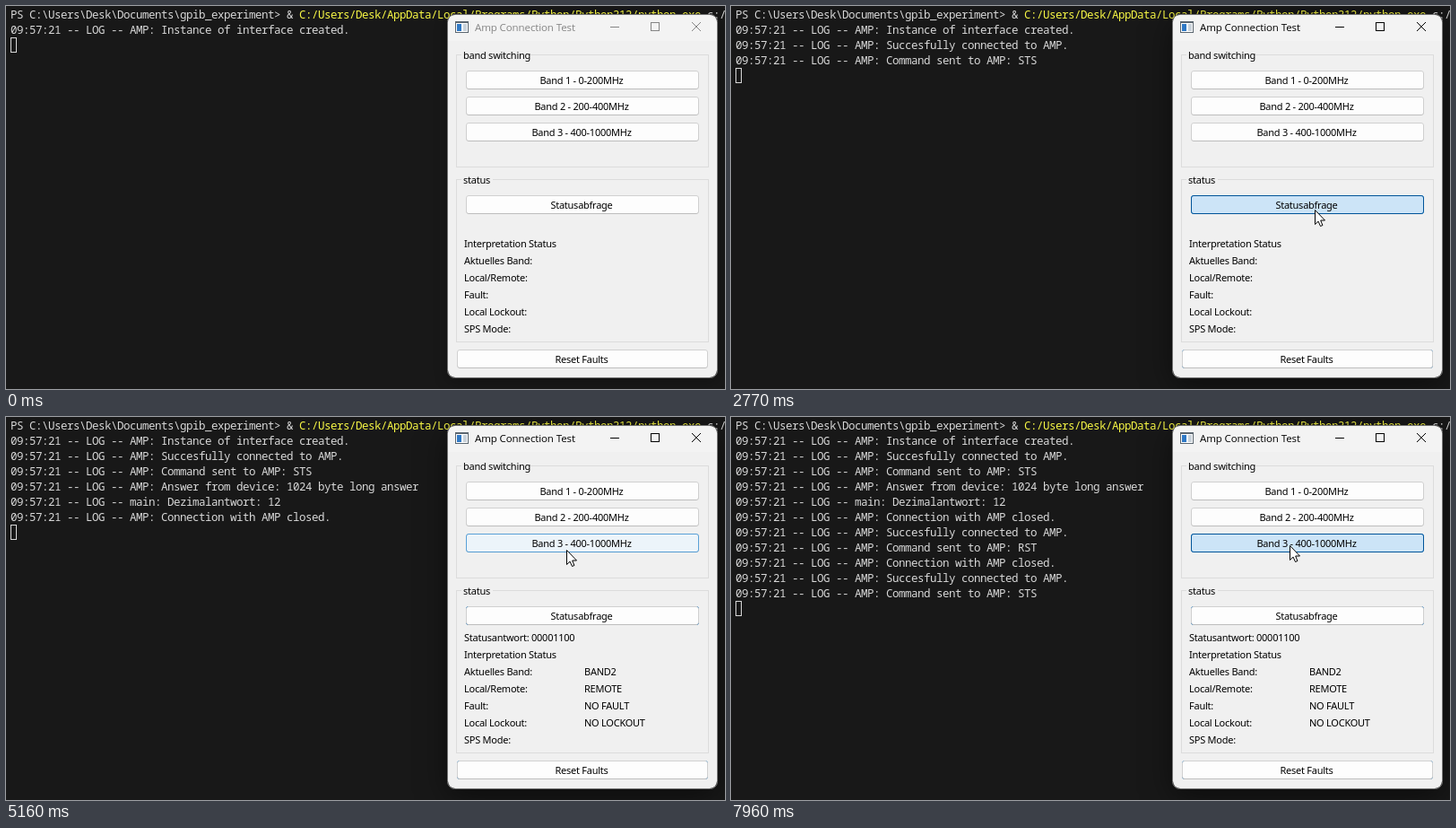
Write an HTML page with a canvas that moves like this. It is 802 by 427 pixels and loops after 8000 ms.

```html
<!DOCTYPE html>
<html lang="en">
<head>
<meta charset="utf-8">
<title>Amp Connection Test</title>
<style>
html, body { margin: 0; width: 100%; height: 100%; overflow: hidden; background: #181818; }
canvas { display: block; }
</style>
</head>
<body>
<canvas id="stage" width="802" height="427"></canvas>
<script>
const ctx = document.getElementById('stage').getContext('2d');
const LOOP = 8000, TICK = 70, FADE = 240;
const PRESS = 1430, ANSWER = 3170;

const MONO = { font: '500 12.5px "Noto Sans Mono", monospace', spacing: -0.5 };
const UI = { font: '11px "Noto Sans", sans-serif', spacing: -0.25 };
const TITLE = { font: '11.5px "Open Sans", sans-serif', spacing: -0.1 };

const NORMAL = { fill: '#fdfdfd', side: '#d0d0d0', base: '#bababa' };
const HOVER = { fill: '#e0eef9', side: '#0078d4', base: '#0078d4' };
const PRESSED = { fill: '#cce4f7', side: '#005499', base: '#005499' };

// Terminal output in batches: time, lines
const LOG = [
  [0, 'AMP: Instance of interface created.'],
  [2770, 'AMP: Succesfully connected to AMP.', 'AMP: Command sent to AMP: STS'],
  [ANSWER, 'AMP: Answer from device: 1024 byte long answer',
    'main: Dezimalantwort: 12', 'AMP: Connection with AMP closed.'],
  [6970, 'AMP: Succesfully connected to AMP.', 'AMP: Command sent to AMP: RST',
    'AMP: Connection with AMP closed.'],
  [7960, 'AMP: Succesfully connected to AMP.', 'AMP: Command sent to AMP: STS']
];

// The pointer glides between three resting points
const ENTRY = { x: 742, y: 406 }, STATUS = { x: 651, y: 227 }, BAND = { x: 623, y: 143 };
const GLIDES = [
  { from: 310, to: 1065, a: ENTRY, b: STATUS },
  { from: 4040, to: 5500, a: STATUS, b: BAND }
];

// Start of each fade and the look it leads to
const RESET_FADES = [[310, HOVER], [380, NORMAL]];
const STATUS_FADES = [[1020, HOVER], [PRESS, PRESSED], [ANSWER, HOVER], [4180, NORMAL]];
const BAND_FADES = [[5020, HOVER], [5630, PRESSED]];

const mix = (a, b, k) => a + (b - a) * k;
const easeOut = k => 1 - (1 - k) ** 2;

// Progress 0..1, advancing in ticks
function progress(t, from, length) {
  const held = Math.floor((t - from) / TICK) * TICK;
  return Math.max(0, Math.min(1, held / length));
}

function text(str, x, y, color = '#000', style = UI, align = 'left') {
  ctx.font = style.font;
  ctx.letterSpacing = style.spacing + 'px';
  ctx.textAlign = align;
  ctx.fillStyle = color;
  ctx.fillText(str, x, y);
}

function rect(color, x, y, w, h) {
  ctx.fillStyle = color;
  ctx.fillRect(x, y, w, h);
}

function frame(color, x, y, w, h) {
  ctx.strokeStyle = color;
  ctx.strokeRect(x + 0.5, y + 0.5, w - 1, h - 1);
}

function rounded(x, y, w, h, r) {
  ctx.beginPath();
  ctx.roundRect(x, y, w, h, r);
}

function line(color, x1, y1, x2, y2) {
  ctx.strokeStyle = color;
  ctx.beginPath();
  ctx.moveTo(x1, y1);
  ctx.lineTo(x2, y2);
  ctx.stroke();
}

function terminal(t) {
  rect('#181818', 0, 0, 802, 427);
  const mono = (s, col, row, color = '#d8d8d8') =>
    text(s, 5 + col * 7, 14 + row * 17, color, MONO);
  mono('PS C:\\Users\\Desk\\Documents\\gpib_experiment> &', 0, 0);
  mono('C:/Users/Desk/AppData/Local/Programs/Python/Python312/python.exe', 46, 0, '#f8f845');
  mono('c:/', 111, 0);
  const lines = LOG.filter(([at]) => at <= t).flatMap(([, ...batch]) => batch);
  lines.forEach((s, i) => mono('09:57:21 -- LOG -- ' + s, 0, i + 1));
  frame('#d8d8d8', 5, 18 + lines.length * 17, 7, 17);
}

function buttonFace(x, y, w, look) {
  const edge = ctx.createLinearGradient(0, y + 17, 0, y + 21);
  edge.addColorStop(0, look.side);
  edge.addColorStop(1, look.base);
  rounded(x + 0.5, y + 0.5, w - 1, 20, 2.5);
  ctx.fillStyle = look.fill;
  ctx.fill();
  ctx.strokeStyle = edge;
  ctx.stroke();
}

function button(label, x, y, w, t = 0, fades = []) {
  buttonFace(x, y, w, NORMAL);
  for (const [at, look] of fades) {
    ctx.globalAlpha = progress(t, at, FADE);
    buttonFace(x, y, w, look);
  }
  ctx.globalAlpha = 1;
  text(label, x + w / 2 - 1, y + 15, '#000', UI, 'center');
}

function group(label, y, h, gap) {
  frame('#dcdcdc', 502, y, 282, h);
  rect('#f0f0f0', 508, y - 2, gap, 5);
  text(label, 510, y + 5);
}

function titleBar(active) {
  const ink = active ? '#000' : '#858585';
  rect('#5b6670', 501, 17, 15, 13);
  rect('#fff', 502, 19, 13, 10);
  rect('#2f78c4', 503, 20, 5, 8);
  rect('#c9d2da', 510, 20, 4, 8);
  text('Amp Connection Test', 523, 28, ink, TITLE);
  line(ink, 674, 23.5, 684, 23.5);
  frame(ink, 719, 18, 10, 10);
  line(ink, 765, 18, 775, 28);
  line(ink, 775, 18, 765, 28);
}

function dialog(t) {
  const active = t >= PRESS;
  ctx.save();
  ctx.shadowColor = `rgba(0,0,0,${active ? 0.5 : 0.3})`;
  ctx.shadowBlur = active ? 34 : 16;
  ctx.shadowOffsetY = active ? 8 : 4;
  rounded(493, 10, 300, 404, 8);
  ctx.fillStyle = '#f0f0f0';
  ctx.fill();
  ctx.restore();
  rounded(493, 10, 300, 29, [8, 8, 0, 0]);
  ctx.fillStyle = '#f3f3f3';
  ctx.fill();
  rounded(492.5, 9.5, 301, 405, 8);
  ctx.strokeStyle = '#757575';
  ctx.stroke();
  titleBar(active);

  group('band switching', 54, 126, 76);
  button('Band 1 - 0-200MHz', 513, 72, 260);
  button('Band 2 - 200-400MHz', 513, 101, 260);
  button('Band 3 - 400-1000MHz', 513, 130, 260, t, BAND_FADES);

  group('status', 193, 182, 35);
  button('Statusabfrage', 513, 211, 260, t, STATUS_FADES);
  button('Reset Faults', 503, 383, 280, t, RESET_FADES);

  const column = (x, y, items) => items.forEach((s, i) => text(s, x, y + i * 19));
  column(511, 269, ['Interpretation Status', 'Aktuelles Band:', 'Local/Remote:',
    'Fault:', 'Local Lockout:', 'SPS Mode:']);
  if (t >= ANSWER) {
    column(511, 250, ['Statusantwort: 00001100']);
    column(645, 288, ['BAND2', 'REMOTE', 'NO FAULT', 'NO LOCKOUT']);
  }
}

function pointer(t) {
  const glide = GLIDES.filter(g => g.from <= t).pop();
  if (!glide) return;
  const { from, to, a, b } = glide;
  const k = easeOut(progress(t, from, to - from));
  ctx.save();
  ctx.translate(Math.round(mix(a.x, b.x, k)) + 0.5, Math.round(mix(a.y, b.y, k)) + 0.5);
  const arrow = new Path2D('M0 0V16L3.6 12.6L6 18L8.4 17L6.2 11.5H11Z');
  ctx.fillStyle = '#fff';
  ctx.fill(arrow);
  ctx.strokeStyle = '#000';
  ctx.stroke(arrow);
  ctx.restore();
}

const begin = performance.now();
function tick() {
  const t = (performance.now() - begin) % LOOP;
  terminal(t);
  dialog(t);
  pointer(t);
  requestAnimationFrame(tick);
}
tick();
</script>
</body>
</html>
```
